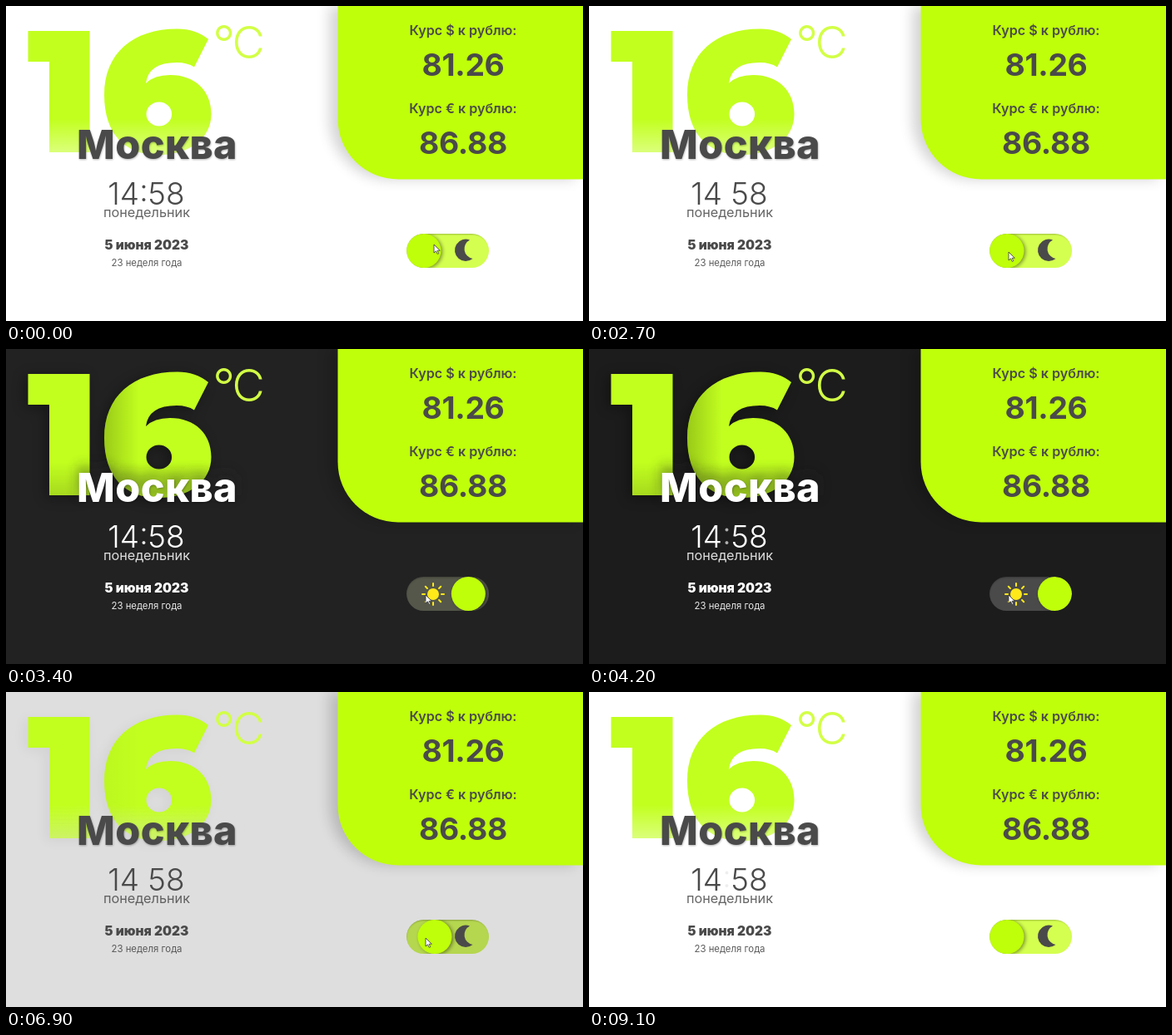
These frames come from a looping animation (693x379 px, 9200 ms). An HTML page:

```html
<!DOCTYPE html>
<html lang="ru">
<head>
<meta charset="utf-8">
<title>Погода и курсы</title>
<style>
  html, body { margin: 0; width: 100%; height: 100%; overflow: hidden; background: #fff; }
  svg { display: block; width: 100%; height: 100%; font-family: Inter, "Open Sans", sans-serif; }
  .mid { text-anchor: middle; }
  .rate { fill: #4a4a4a; }
  .label { font-size: 16.1px; font-weight: 600; }
  .value { font-size: 37.3px; font-weight: 700; letter-spacing: -.3px; }
  .city { font-size: 48.5px; font-weight: 800; letter-spacing: .4px; }
</style>
</head>
<body>
<svg viewBox="0 0 693 379" preserveAspectRatio="none">
  <defs>
    <filter id="soft" x="-20%" y="-20%" width="140%" height="140%"><feGaussianBlur stdDeviation="8"/></filter>
    <filter id="near" x="-40%" y="-40%" width="180%" height="180%"><feGaussianBlur stdDeviation="2"/></filter>
    <filter id="fine" x="-10%" y="-20%" width="120%" height="140%"><feGaussianBlur stdDeviation="1"/></filter>
    <linearGradient id="fade" gradientUnits="userSpaceOnUse" x1="0" y1="136" x2="0" y2="180">
      <stop class="stop" offset="0" stop-opacity="0"/>
      <stop class="stop" offset="1" stop-opacity=".45"/>
    </linearGradient>
    <linearGradient id="side" gradientUnits="userSpaceOnUse" x1="116" y1="0" x2="160" y2="0">
      <stop offset="0" stop-opacity=".22"/>
      <stop offset="1" stop-opacity="0"/>
    </linearGradient>
    <clipPath id="pill"><rect x="481" y="274" width="99" height="41" rx="20.5"/></clipPath>
    <path id="one" d="M26.5 30H100.5V176H52V67H26.5Z"/>
    <path id="six" fill-rule="evenodd" d="M243 40L226 73.5Q218 68 205 68Q171 68 168 93Q178 83 197 83
      C227 83 246.5 102 246.5 130C246.5 160 219 179 183 179C143 179 118 154 118 107
      C118 57 152 27.5 206 27.5C220 27.5 234 32 243 40Z
      M168.5 130a15.3 14.5 0 1 0 30.6 0a15.3 14.5 0 1 0 -30.6 0Z"/>
    <g id="degrees"><use href="#one"/><use href="#six"/></g>
    <path id="panel" d="M398.5 0H693V208.5H471A72.5 72.5 0 0 1 398.5 136Z"/>
  </defs>

  <rect id="bg" width="693" height="379"/>

  <use href="#panel" x="-10" filter="url(#soft)" opacity=".17"/>
  <use href="#panel" fill="#bfff0a"/>
  <g class="mid rate">
    <text class="label" x="549" y="35">Курс $ к рублю:</text>
    <text class="value" x="549" y="84">81.26</text>
    <text class="label" x="549" y="129">Курс € к рублю:</text>
    <text class="value" x="549" y="178">86.88</text>
  </g>

  <g role="img" aria-label="16">
    <use id="halo" href="#degrees" x="-4" y="3" filter="url(#soft)"/>
    <use href="#degrees" fill="#c2ff1f"/>
    <use id="depth" href="#six" fill="url(#side)"/>
    <use id="haze" href="#degrees" fill="url(#fade)"/>
  </g>
  <g fill="#d2ff45" font-weight="300">
    <text x="248" y="67" font-size="60">°</text>
    <text x="271.5" y="62.5" font-size="54">C</text>
  </g>

  <g class="mid">
    <text id="glow" class="city" x="181.5" y="176" filter="url(#soft)">Москва</text>
    <text class="city" x="182" y="185" filter="url(#fine)" opacity=".3">Москва</text>
    <g id="info">
      <text class="city" x="181.5" y="183.7">Москва</text>
      <text x="168.5" y="239" font-size="37" font-weight="300">14<tspan id="colon">:</tspan>58</text>
      <text x="169" y="254" font-size="16.3" fill-opacity=".85">понедельник</text>
      <text x="169" y="293" font-size="15.5" font-weight="900">5 июня 2023</text>
      <text x="169" y="313" font-size="11.4" fill-opacity=".9">23 неделя года</text>
    </g>
  </g>

  <g clip-path="url(#pill)">
    <rect id="track" x="481" y="274" width="99" height="41"/>
    <rect x="479" y="273" width="104" height="46" rx="22" fill="none" stroke="#000" stroke-width="3" opacity=".35" filter="url(#fine)"/>
    <g id="knob">
      <circle cx="2" cy="1" r="20.5" opacity=".4" filter="url(#near)"/>
      <circle r="20.5" fill="#bfff0a"/>
    </g>
  </g>
  <path id="moon" fill="#4a4a4a" d="M557 281.5A13.2 13.2 0 1 0 560.5 304A12 12 0 0 1 557 281.5Z"/>
  <g id="sun" transform="translate(513 295)" fill="#ffe81a" stroke="#ffe81a" stroke-width="2" stroke-linecap="round">
    <circle r="7" stroke="none"/>
    <path id="rays"/>
  </g>
  <path id="cursor" d="M0 0V10L2.5 7.8L4.2 11.4L5.8 10.7L4.1 7.2H7.3Z" fill="#fff" stroke="#333" stroke-width=".8"/>
</svg>
<script>
  const LOOP = 9200, STEP = 100;
  const TO_DARK = 3116, TO_LIGHT = 6665;
  const $ = id => document.getElementById(id);
  const set = (id, name, value) => $(id).setAttribute(name, value);
  const clamp = x => Math.max(0, Math.min(1, x));
  const lerp = (a, b, p) => a + (b - a) * p;
  const swing = x => .5 - .5 * Math.cos(Math.PI * clamp(x));
  const mix = (a, b, p) => `rgb(${a.map((v, i) => Math.round(lerp(v, b[i], p)))})`;

  // CSS ease-in-out: cubic-bezier(.42, 0, .58, 1)
  function ease(x) {
    x = clamp(x);
    let lo = 0, hi = 1;
    for (let i = 0; i < 24; i++) {
      const s = (lo + hi) / 2;
      const bx = 3 * s * (1 - s) ** 2 * .42 + 3 * s * s * (1 - s) * .58 + s ** 3;
      if (bx < x) lo = s; else hi = s;
    }
    return lo * lo * (3 - 2 * lo);
  }

  const darkness = (t, span) => ease((t - TO_DARK) / span) - ease((t - TO_LIGHT) / span);

  // Half a second each: fade out, hidden, fade in, shown
  function blink(t) {
    const p = t % 2000;
    return p < 1000 ? 1 - swing(p / 500) : swing((p - 1000) / 500);
  }

  function cursorAt(t) {
    const come = swing((t - 100) / 800), go = clamp((t - 7200) / 400) ** 2;
    return [lerp(lerp(514, 504, come), 530, go), lerp(lerp(287, 296, come), 392, go)];
  }

  let rays = "";
  for (let i = 0; i < 8; i++) {
    const c = Math.cos(i * Math.PI / 4), s = Math.sin(i * Math.PI / 4);
    rays += `M${10 * c} ${10 * s}L${13 * c} ${13 * s}`;
  }
  set("rays", "d", rays);

  function draw(t) {
    const dark = t >= TO_DARK && t < TO_LIGHT;
    const shade = darkness(t, 320), slide = darkness(t, 350);
    const back = mix([255, 255, 255], [28, 28, 28], shade);
    set("bg", "fill", back);
    document.querySelectorAll(".stop").forEach(s => s.setAttribute("stop-color", back));
    set("halo", "opacity", shade * .35);
    set("depth", "opacity", shade);
    set("haze", "opacity", 1 - shade * .6);
    set("glow", "fill", back);
    set("glow", "opacity", shade * .5);
    set("info", "fill", dark ? "#fff" : "#4a4a4a");
    set("colon", "fill-opacity", blink(t));
    set("track", "fill", mix([212, 255, 80], [74, 74, 74], slide));
    set("knob", "transform", `translate(${lerp(502, 559.5, slide)} 294.5)`);
    set("moon", "opacity", dark ? 0 : 1);
    set("sun", "opacity", dark ? clamp(slide * 3) : 0);
    set("cursor", "transform", `translate(${cursorAt(t)})`);
  }

  const start = performance.now();
  function tick() {
    const t = (performance.now() - start) % LOOP;
    draw(Math.floor(t / STEP) * STEP);
    requestAnimationFrame(tick);
  }
  tick();
</script>
</body>
</html>
```
